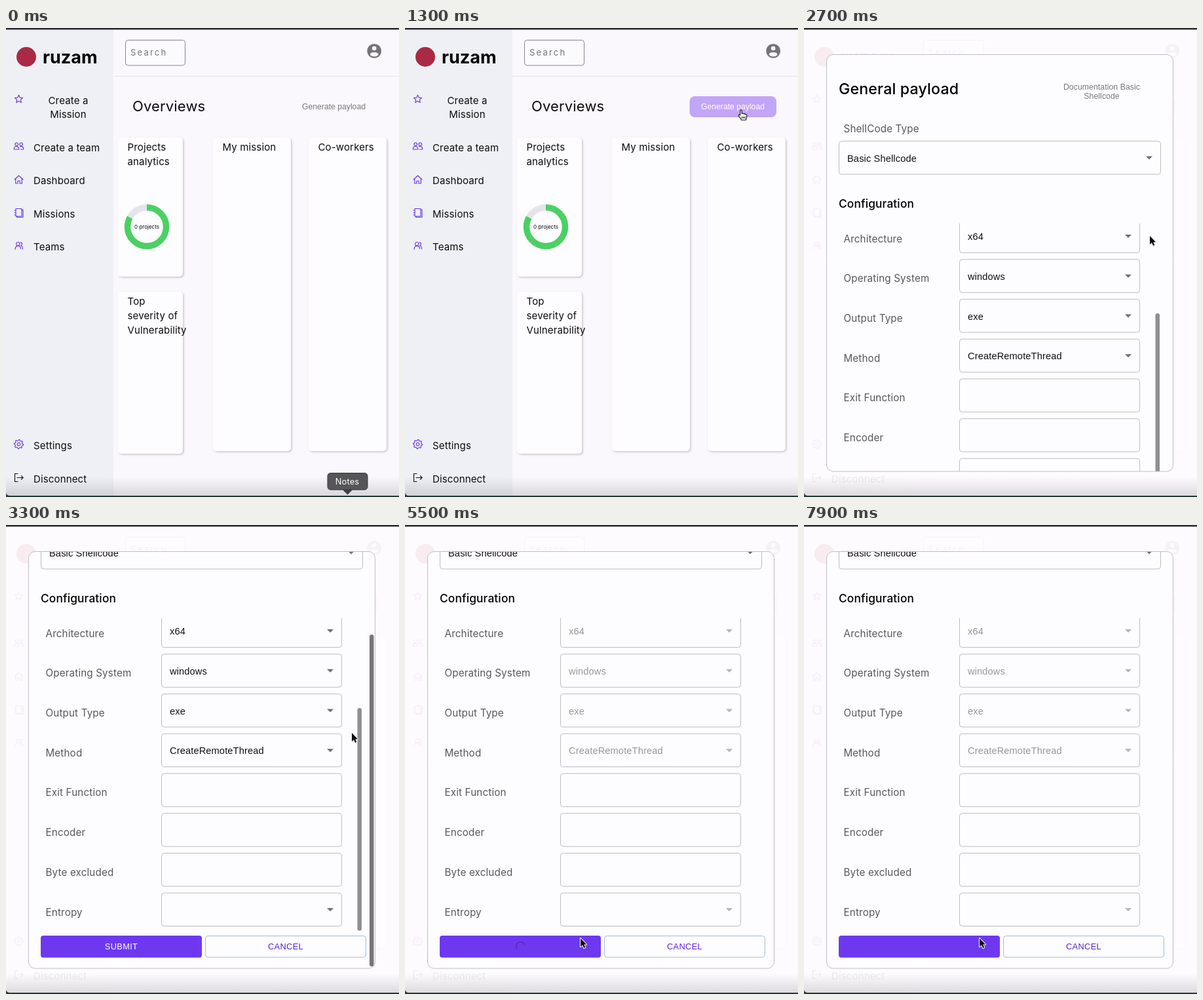
An HTML page with a canvas that plays this animation: 600x715 px, repeating every 8 s.

```html
<!DOCTYPE html>
<html lang="en">
<head>
<meta charset="utf-8">
<title>Payload dashboard</title>
<style>
html, body { margin: 0; width: 100%; height: 100%; overflow: hidden; background: #faf8fd; }
canvas { display: block; width: 600px; height: 715px; }
</style>
</head>
<body>
<canvas id="stage"></canvas>
<script>
const W = 600, H = 715, LOOP = 8000;
const canvas = document.getElementById('stage');
const ctx = canvas.getContext('2d');
const dpr = window.devicePixelRatio || 1;
canvas.width = W * dpr;
canvas.height = H * dpr;

const UI = 'Inter, sans-serif';
const ARIAL = '"Liberation Sans", Arial, sans-serif';
const PURPLE = '#6a35e0';

const clamp = v => Math.max(0, Math.min(1, v));
const span = (t, a, b) => clamp((t - a) / (b - a));
const smooth = v => v * v * (3 - 2 * v);
const easeOut = v => 1 - (1 - v) ** 3;

// Timeline
const HOVER = 1000, OPEN = 1430, LOADING = 5058;
const MODAL_SCROLL = 156, LIST_SCROLL = 188.5;

// time, x, y
const CURSOR = [
  [300, 521, 732], [1060, 513, 125], [1450, 513, 125], [1880, 491, 266],
  [2000, 491, 266], [2100, 528, 317], [3700, 528, 317], [4350, 270, 602],
  [4650, 270, 602], [4900, 268, 630]
];

// label, value, is a select
const FIELDS = [
  ['Callback Address', '10.0.2.2', false],
  ['CallBack Port', '4444', false],
  ['Exploit', 'x64/shell_reverse_tcp', true],
  ['Architecture', 'x64', true],
  ['Operating System', 'windows', true],
  ['Output Type', 'exe', true],
  ['Method', 'CreateRemoteThread', true],
  ['Exit Function', '', false],
  ['Encoder', '', false],
  ['Byte excluded', '', false],
  ['Entropy', '', true]
];
const fieldTop = i => 298.5 + 60.7 * i;

function text(str, x, y, size, o = {}) {
  ctx.font = `${o.weight || 400} ${size}px ${o.family || UI}`;
  ctx.letterSpacing = (o.gap ?? 0.15) + 'px';
  ctx.textAlign = o.align || 'left';
  ctx.fillStyle = o.color || '#0c0c0e';
  ctx.fillText(str, x, y);
}

function box(x, y, w, h, r, fill, stroke) {
  ctx.beginPath();
  ctx.roundRect(x, y, w, h, r);
  if (fill) { ctx.fillStyle = fill; ctx.fill(); }
  if (stroke) { ctx.strokeStyle = stroke; ctx.lineWidth = 1; ctx.stroke(); }
}

function disc(x, y, r, color) {
  ctx.fillStyle = color;
  ctx.beginPath();
  ctx.arc(x, y, r, 0, Math.PI * 2);
  ctx.fill();
}

// Outline icon, path relative to its centre
function icon(x, y, d, color = PURPLE) {
  ctx.save();
  ctx.translate(x, y);
  ctx.strokeStyle = color;
  ctx.lineWidth = 1.15;
  ctx.lineJoin = ctx.lineCap = 'round';
  ctx.stroke(new Path2D(d));
  ctx.restore();
}

function ring(n, shape) {
  let d = '';
  for (let i = 0; i < n; i++) {
    const a = i / n * Math.PI * 2 - Math.PI / 2, r = shape(i);
    d += `${i ? 'L' : 'M'}${r * Math.cos(a)} ${r * Math.sin(a)}`;
  }
  return d + 'Z';
}

const ICONS = {
  star: ring(10, i => i % 2 ? 3 : 6.3),
  people: 'M-3.3 -5.5a2.3 2.3 0 1 0 .01 0M3.7 -5.5a2.3 2.3 0 1 0 .01 0M-7.3 4.5c0 -6 7.5 -6 7.5 0zM2 .3c3 -1.5 5.5 .5 5.3 4.2h-4.5',
  house: 'M-6.5 0L0 -6L6.5 0M-4.8 -1.2V6H-1.6V2H1.6V6H4.8V-1.2',
  book: 'M-4.5 -6H4.5V5.5H-4.5ZM4.5 -4.5H6.5V7H-3V5.5M-6.5 -3.5H-4.5M-6.5 0H-4.5M-6.5 3.5H-4.5',
  team: 'M-1.3 -5.5a2.7 2.7 0 1 0 .01 0M-5.5 5.5c0 -7 8 -7 8.5 -1M2.5 -5.2c3 0 3.3 4.2 .6 5c2 .6 2.8 2.3 2.9 5.2',
  gear: ring(32, i => i % 4 < 2 ? 7 : 5.4) + 'M2.3 0A2.3 2.3 0 1 1 2.3 -.01',
  exit: 'M-1.5 -6H-6V6H-1.5M-2.5 0H6.5M3.8 -2.8L6.6 0L3.8 2.8'
};

function sidebar() {
  ctx.fillStyle = '#eef0f5';
  ctx.fillRect(0, 0, 164, H);
  disc(31, 44, 15, '#a92a45');
  text('ruzam', 56, 54, 27, { weight: 700, gap: 0, color: '#000' });
  text('Create a', 95, 116, 15, { align: 'center' });
  text('Mission', 95, 137, 15, { align: 'center' });
  icon(19.5, 108.5, ICONS.star);
  [['Create a team', 'people', 182.5], ['Dashboard', 'house', 233], ['Missions', 'book', 283.5],
   ['Teams', 'team', 334], ['Settings', 'gear', 636.5], ['Disconnect', 'exit', 687.5]
  ].forEach(([label, name, y]) => {
    icon(19.5, y - 2, ICONS[name], name === 'exit' ? '#111' : PURPLE);
    text(label, 42, y + 5, 15);
  });
}

function card(x, y, w, h, lines) {
  ctx.save();
  ctx.shadowColor = 'rgba(0,0,0,.2)';
  ctx.shadowBlur = 3 * dpr;
  ctx.shadowOffsetX = ctx.shadowOffsetY = 1.5 * dpr;
  box(x, y, w, h, 5, '#fdfcfe');
  ctx.restore();
  lines.forEach((s, i) => text(s, x + 14.5, y + 20 + 22 * i, 15));
}

function donut(x, y) {
  const start = -Math.PI / 2, end = start + Math.PI * 2 * 0.83;
  ctx.lineWidth = 9.5;
  [['#e3e5ea', end, start + Math.PI * 2], ['#4bd063', start, end]].forEach(([color, a, b]) => {
    ctx.strokeStyle = color;
    ctx.beginPath();
    ctx.arc(x, y, 29.5, a, b);
    ctx.stroke();
  });
  text('0 projects', x, y + 3, 8, { align: 'center', gap: 0 });
}

function page(t) {
  ctx.fillStyle = '#faf8fd';
  ctx.fillRect(0, 0, W, H);
  sidebar();

  box(182.5, 18.5, 91, 38.5, 4, '#fbfafd', '#86868a');
  text('Search', 190, 42, 13, { gap: 2.2, color: '#757578' });
  ctx.fillStyle = '#e5e4ea';
  ctx.fillRect(164, 73, 436, 1);

  disc(562.2, 35, 10.8, '#747476');
  disc(562.2, 31, 3.3, '#faf8fd');
  ctx.beginPath();
  ctx.ellipse(562.2, 40.2, 6.3, 3.3, 0, 0, Math.PI * 2);
  ctx.fill();

  text('Overviews', 193, 127, 22);
  const hover = span(t, HOVER, HOVER + 220);
  ctx.globalAlpha = hover;
  box(434.5, 104, 132.5, 32, 8, '#c3a5f7');
  ctx.globalAlpha = 1;
  const c = Math.round(120 + 135 * hover);
  text('Generate payload', 500.5, 124, 12.2, { family: ARIAL, align: 'center', gap: 0, color: `rgb(${c},${c},${c})` });

  card(171, 167, 99, 212, ['Projects', 'analytics']);
  card(171, 402, 99, 247, ['Top', 'severity of', 'Vulnerability']);
  card(316, 167, 119, 478, ['My mission']);
  card(462, 167, 119, 478, ['Co-workers']);
  donut(215, 303);
}

function field(x, y, w, value, select, off, hot) {
  box(x, y, w, 50.5, 4, null, hot ? '#1c1c1e' : '#bdbcc1');
  const color = off ? '#97969a' : '#111';
  text(value, x + 12.5, y + 31, 14.6, { family: ARIAL, gap: 0.14, color });
  if (!select) return;
  const ax = x + w - 17.5, ay = y + 25;
  ctx.fillStyle = off ? '#b5b4b8' : '#6f6e72';
  ctx.beginPath();
  ctx.moveTo(ax - 5, ay - 2);
  ctx.lineTo(ax + 5, ay - 2);
  ctx.lineTo(ax, ay + 3);
  ctx.fill();
}

function spinner(t) {
  const p = (t - LOADING) / 1400 % 1;
  const grow = smooth(clamp(p * 2)), run = smooth(clamp(p * 2 - 1));
  const unit = 1 / 20.2;
  const offset = 15 * grow + 110 * run;
  const end = Math.min(126.9, offset + 1 + 99 * grow);
  const turn = p * Math.PI * 2;
  ctx.strokeStyle = 'rgba(0,0,0,.3)';
  ctx.lineWidth = 1.2;
  ctx.beginPath();
  ctx.arc(176.5, 798.5, 6.9, turn + offset * unit, turn + end * unit);
  ctx.stroke();
}

function scrolls(t) {
  return {
    list: LIST_SCROLL * easeOut(span(t, 2230, 2700)),
    modal: MODAL_SCROLL * easeOut(span(t, 3110, 3290))
  };
}

function cursorAt(t) {
  if (t < CURSOR[0][0]) return null;
  for (let i = 1; i < CURSOR.length; i++) {
    const [a, x0, y0] = CURSOR[i - 1], [b, x1, y1] = CURSOR[i];
    if (t < b) {
      const k = smooth(span(t, a, b));
      return { x: x0 + (x1 - x0) * k, y: y0 + (y1 - y0) * k };
    }
  }
  const [, x, y] = CURSOR[CURSOR.length - 1];
  return { x, y };
}

function hotField(t, cur) {
  if (!cur || t < OPEN + 100 || t > LOADING) return -1;
  const s = scrolls(t);
  if (cur.x < 237 || cur.x > 512 || cur.y < 298 - s.modal || cur.y > 620) return -1;
  const y = cur.y + s.list + s.modal;
  return FIELDS.findIndex((f, i) => y > fieldTop(i) && y < fieldTop(i) + 51);
}

function bar(x, y, h, color, alpha) {
  ctx.globalAlpha = alpha;
  box(x, y, 6.5, h, 3.2, color);
  ctx.globalAlpha = 1;
}

function modal(t, hot) {
  const s = scrolls(t), loading = t >= LOADING;
  box(34.5, 40.5, 529, 635.5, 10, '#fdfcfe');
  ctx.save();
  ctx.clip();
  ctx.translate(0, -s.modal);

  text('General payload', 53, 101, 23.2, { weight: 500, color: '#000' });
  ['Documentation Basic', 'Shellcode'].forEach((line, i) =>
    text(line, 454.5, 93.5 + 14 * i, 12.2, { family: ARIAL, align: 'center', gap: 0.1, color: '#77767a' }));
  text('ShellCode Type', 60.5, 159, 15.2, { color: '#58575b' });
  field(53.5, 172.5, 491, 'Basic Shellcode', true, false, false);
  text('Configuration', 53, 274, 17.3, { weight: 500, color: '#000' });

  ctx.save();
  ctx.beginPath();
  ctx.rect(40, 298, 510, 478);
  ctx.clip();
  ctx.translate(0, -s.list);
  FIELDS.forEach(([label, value, select], i) => {
    const y = fieldTop(i);
    text(label, 60.5, y + 34.5, 15.2, { color: '#58575b' });
    field(237.5, y, 275, value, select, loading, i === hot);
  });
  ctx.restore();

  if (t > 2230 && t < 3600)
    bar(536.5, 301 + 134 * s.list / LIST_SCROLL, 339.5, '#8f8e92', 1 - span(t, 3350, 3600));

  box(53, 782, 246, 33.5, 4, '#6e38f0');
  if (loading) spinner(t);
  else text('SUBMIT', 176, 803, 12.8, { family: ARIAL, align: 'center', gap: 0.35, color: '#fff' });
  box(304.5, 782.5, 245, 32.5, 4, null, '#a3bbdc');
  text('CANCEL', 427, 803, 12.8, { family: ARIAL, align: 'center', gap: 0.35, color: '#5a22d8' });
  ctx.restore();

  if (t > 3110 && t < 4000)
    bar(555, 42 + 125 * s.modal / MODAL_SCROLL, 506, '#777679', 1 - span(t, 3760, 4000));
  box(34.5, 40.5, 529, 635.5, 10, null, '#bfbec3');
}

function windowEdges() {
  const g = ctx.createLinearGradient(0, 684, 0, 713);
  g.addColorStop(0, 'rgba(60,60,70,0)');
  g.addColorStop(1, 'rgba(60,60,70,.17)');
  ctx.fillStyle = g;
  ctx.fillRect(0, 684, W, 29);
  ctx.fillStyle = '#2c2b31';
  ctx.fillRect(0, 0, W, 2.5);
  ctx.fillStyle = '#233a38';
  ctx.fillRect(0, 713, W, 2);
  ctx.beginPath();
  ctx.moveTo(0, 708);
  ctx.quadraticCurveTo(0.5, 713, 6, 713);
  ctx.lineTo(0, 713);
  ctx.fill();
}

function tooltip() {
  ctx.fillStyle = ctx.strokeStyle = '#414144';
  ctx.beginPath();
  ctx.moveTo(513, 703);
  ctx.lineTo(521.5, 711.5);
  ctx.lineTo(530, 703);
  ctx.fill();
  box(491, 678.5, 61, 25.5, 4.5, '#565659', '#39393c');
  text('Notes', 521, 695.5, 12.8, { align: 'center', color: '#fff' });
}

const ARROW = new Path2D('M0 0V13L3 10.3L5.2 15L7.3 14L5.2 9.6H9.2Z');
const HAND = new Path2D('M-1.2 8V1.2C-1.2 -.6 1.3 -.6 1.3 1.2V5.5C2 4.6 3.7 4.8 3.9 6C4.8 5.2 6.2 5.6 6.4 6.8C7.4 6.2 8.7 6.7 8.7 8V10.5C8.7 12.5 7.6 13 7.5 15.2H.4C0 13 -2.2 11.6 -3.6 9C-4.3 7.4 -2.3 6.6 -1.2 8Z');
const KNUCKLES = new Path2D('M1.6 10V13M3.8 10V13M6 10V13');
const BEAM = new Path2D('M-2.5 -7Q0 -7 0 -5.5Q0 -7 2.5 -7M0 -5.5V5.5M-2.5 7Q0 7 0 5.5Q0 7 2.5 7');

function pointer(t, cur, hot) {
  const onButton = t < OPEN + 60 && cur.y > 104 && cur.y < 136;
  const onSubmit = t > 4700 && t < LOADING && cur.y > 626;
  ctx.save();
  ctx.translate(cur.x, cur.y);
  ctx.lineJoin = 'round';
  ctx.strokeStyle = '#111';
  if (onButton || onSubmit || (hot >= 0 && FIELDS[hot][2])) {
    ctx.fillStyle = '#fff';
    ctx.lineWidth = 1.1;
    ctx.fill(HAND);
    ctx.stroke(HAND);
    ctx.stroke(KNUCKLES);
  } else if (hot >= 0) {
    ctx.lineWidth = 1;
    ctx.stroke(BEAM);
  } else {
    ctx.strokeStyle = '#fff';
    ctx.fillStyle = '#0a0a0a';
    ctx.lineWidth = 2;
    ctx.stroke(ARROW);
    ctx.fill(ARROW);
  }
  ctx.restore();
}

// Modal layer is composed separately so that it fades as one
function fadeModal(t, hot) {
  const shown = smooth(span(t, OPEN, OPEN + 230));
  if (!shown) return;
  ctx.globalAlpha = 0.925 * shown;
  ctx.fillStyle = '#fefcfe';
  ctx.fillRect(0, 0, W, H);
  ctx.globalAlpha = 1;
  modal(t, hot);
  if (shown === 1) return;
  const layer = document.createElement('canvas');
  layer.width = canvas.width;
  layer.height = canvas.height;
  layer.getContext('2d').drawImage(canvas, 0, 0);
  page(t);
  ctx.globalAlpha = shown;
  ctx.drawImage(layer, 0, 0, W, H);
  ctx.globalAlpha = 1;
}

function draw(t) {
  ctx.setTransform(dpr, 0, 0, dpr, 0, 0);
  const cur = cursorAt(t), hot = hotField(t, cur);
  page(t);
  fadeModal(t, hot);
  windowEdges();
  if (t < 380) tooltip();
  if (cur) pointer(t, cur, hot);
}

const begin = performance.now();
function tick() {
  draw((performance.now() - begin) % LOOP);
  requestAnimationFrame(tick);
}
tick();
</script>
</body>
</html>
```
